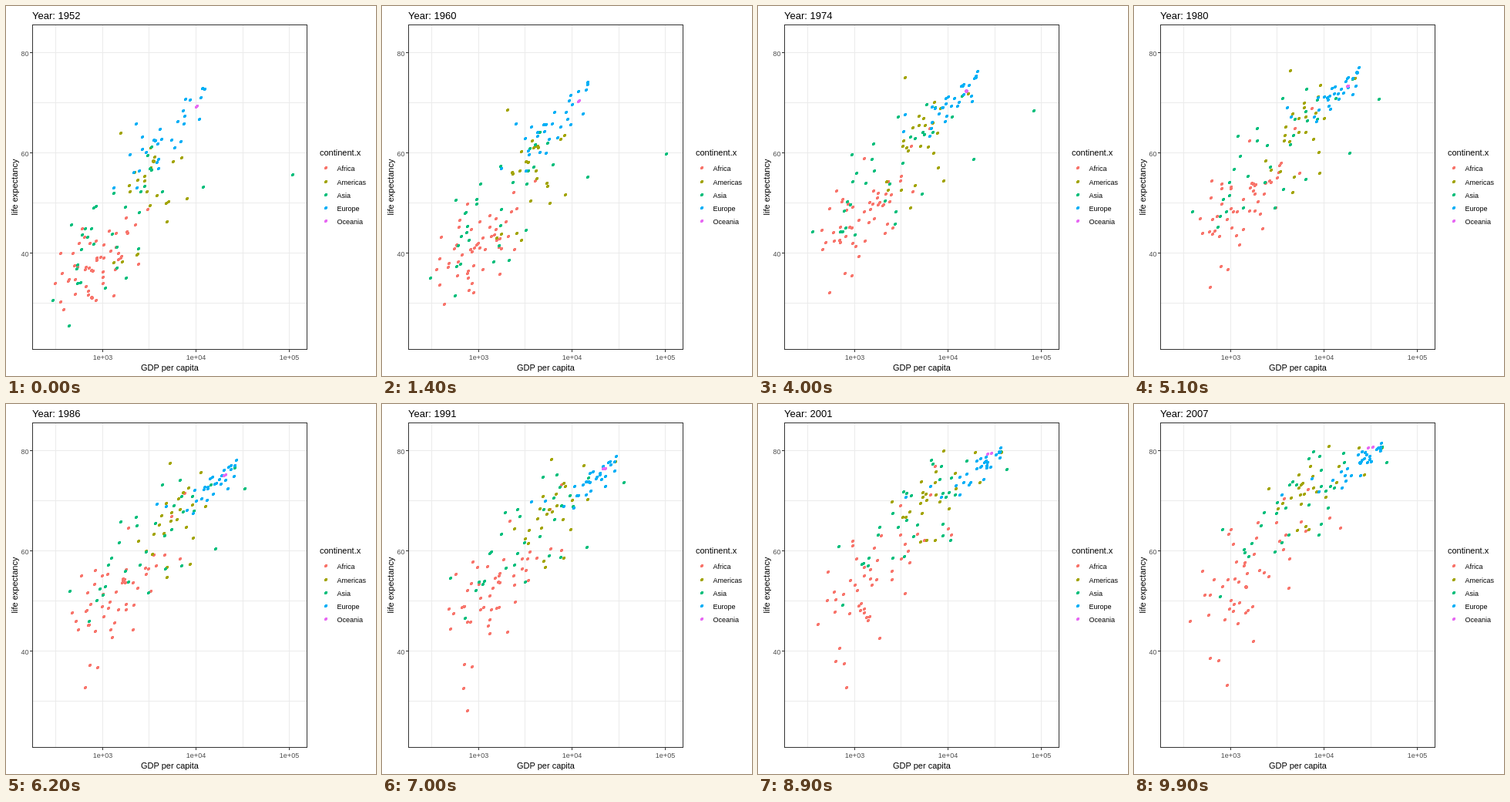
Write an HTML page that moves like this. It is 480x480 px and loops after 10 s.

```html
<!DOCTYPE html>
<html lang="en">
<head>
<meta charset="utf-8">
<title>Life expectancy and GDP per capita</title>
<style>
  html, body { margin: 0; width: 100%; height: 100%; overflow: hidden; background: #fff; }
  svg { display: block; width: 480px; height: 480px; font: 11px "Liberation Sans", Arial, sans-serif; }
  path, rect, circle { shape-rendering: crispEdges; }
  path, rect { fill: none; }
  .small { font-size: 9px; }
  .tick { font-size: 9px; fill: #4d4d4d; }
</style>
</head>
<body>
<svg id="chart" viewBox="0 0 480 480"></svg>
<script>
// Each continent is a cloud of countries whose shape changes from the first year over the middle to the last:
// mean and spread of log10 GDP and of life expectancy, with a correlation (fit) and a skew.
// A path holds [year, log10 GDP, life] for the one country that leaves its cloud.
const continents = [
  { name: 'Africa', color: '#F8766D', count: 51, fit: 0.5, skew: 0.15,
    gdp: [3, 3.21, 3.25], gdpSpread: [0.3, 0.37, 0.43], life: [39.3, 51, 55], lifeSpread: [5.2, 7, 9],
    path: [[1952, 2.69, 40], [1987, 2.93, 44], [1992, 2.87, 23.6], [1997, 2.77, 36.1], [2007, 2.94, 46.2]] },
  { name: 'Americas', color: '#A3A500', count: 25, fit: 0.55, skew: 0.12,
    gdp: [3.53, 3.81, 3.95], gdpSpread: [0.24, 0.25, 0.3], life: [53.3, 65.5, 73.6], lifeSpread: [9, 6.8, 4.2] },
  { name: 'Asia', color: '#00BF7D', count: 32, fit: 0.7, skew: 0.1,
    gdp: [3.17, 3.53, 3.79], gdpSpread: [0.36, 0.48, 0.53], life: [46.3, 61.2, 70.7], lifeSpread: [9, 9, 7.5],
    path: [[1952, 5.035, 55.6], [1957, 5.055, 58], [1967, 4.908, 64.6], [1972, 5.039, 67.7],
      [1977, 4.773, 69.3], [1982, 4.496, 71.3], [2007, 4.675, 77.6]] },
  { name: 'Europe', color: '#00B0F6', count: 30, fit: 0.85, skew: -0.15,
    gdp: [3.69, 4.13, 4.35], gdpSpread: [0.27, 0.2, 0.24], life: [64.4, 72.3, 77.6], lifeSpread: [6, 3.1, 3] },
  { name: 'Oceania', color: '#E76BF3', count: 2, fit: 0.9, skew: 0,
    gdp: [4.01, 4.24, 4.47], gdpSpread: [0.01, 0.03, 0.07], life: [69.3, 73, 80.7], lifeSpread: [0.2, 0.6, 0.5] }
];
const firstYear = 1952, years = 55, steps = 100;

let seed = 7;
function random() {
  seed = (Math.imul(seed, 1664525) + 1013904223) >>> 0;
  return seed / 2 ** 32;
}
const bell = () => 2 * (random() + random() + random() - 1.5);

const mix = (a, b, t) => a + (b - a) * t;
const soften = (v, cap) => v > cap ? cap + 0.2 * (v - cap) : v;

// Value at p (0 to 1) along evenly spaced keys.
function along(keys, p) {
  const i = Math.min(keys.length - 2, Math.floor(p * (keys.length - 1)));
  return mix(keys[i], keys[i + 1], p * (keys.length - 1) - i);
}

// A normal value that wanders slowly while the cloud keeps its spread.
function wanderer() {
  const from = bell(), to = bell();
  return p => from * Math.cos(p) + to * Math.sin(p);
}

function cloudCountry(c) {
  const wealth = wanderer(), health = wanderer();
  return p => {
    const u = wealth(p), v = health(p);
    const gdp = along(c.gdp, p) + along(c.gdpSpread, p) * (u + c.skew * (u * u - 1));
    const life = along(c.life, p) + along(c.lifeSpread, p) * (c.fit * u + Math.sqrt(1 - c.fit ** 2) * v);
    return [soften(gdp, 4.1 + 0.5 * p), soften(life, 71 + 9.5 * p)];
  };
}

function pathCountry(path) {
  return p => {
    const year = firstYear + years * p;
    const k = Math.max(1, path.findIndex(key => key[0] >= year - 1e-6));
    const [y0, gdp0, life0] = path[k - 1], [y1, gdp1, life1] = path[k];
    const t = (year - y0) / (y1 - y0);
    return [mix(gdp0, gdp1, t), mix(life0, life1, t)];
  };
}

const countries = continents.flatMap(c => {
  const places = Array.from({ length: c.count }, () => cloudCountry(c));
  if (c.path) places.push(pathCountry(c.path));
  return places.map(place => ({ place, color: c.color }));
});

const dot = (color, x = 0, y = 0) => `<circle cx="${x}" cy="${y}" r="2" fill="${color}"/>`;
const text = (x, y, s, attrs = '') => `<text x="${x}" y="${y}" ${attrs}>${s}</text>`;
const xTicks = [125.5, 246.5, 367.5], yTicks = [60.5, 190.5, 320.5];
const grid = [64.5, 185.5, 307.5, ...xTicks].map(x => `M${x} 25V445`).join('')
  + [125.5, 255.5, 385.5, ...yTicks].map(y => `M35 ${y}H390`).join('');
const ticks = xTicks.map(x => `M${x} 446v3`).join('') + yTicks.map(y => `M31 ${y}h3`).join('');

const chart = document.getElementById('chart');
chart.innerHTML = `<path d="${grid}" stroke="#ebebeb"/>
  <g id="dots">${countries.map(c => dot(c.color)).join('')}</g>
  <rect x="34.5" y="24.5" width="356" height="421" stroke="#333"/>
  <path d="${ticks}" stroke="#333"/>`
  + text(34, 17, '', 'id="title" font-size="13"')
  + text(212.5, 473, 'GDP per capita', 'text-anchor="middle"')
  + text(-235, 15, 'life expectancy', 'text-anchor="middle" transform="rotate(-90)"')
  + xTicks.map((x, i) => text(x, 459, `1e+0${i + 3}`, 'class="tick" text-anchor="middle"')).join('')
  + yTicks.map((y, i) => text(29.5, y + 4, 80 - 20 * i, 'class="tick" text-anchor="end"')).join('')
  + text(407, 194, 'continent.x')
  + continents.map((c, i) => {
      const y = Math.round(210.3 + 17.28 * i);
      return dot(c.color, 415, y) + text(429.5, y + 4, c.name, 'class="small"');
    }).join('');

const title = document.getElementById('title');
const dots = [...document.getElementById('dots').children];

function draw(now) {
  const p = Math.floor(now / 100) % steps / (steps - 1);
  title.textContent = `Year: ${Math.round(firstYear + years * p)}`;
  countries.forEach(({ place }, i) => {
    const [gdp, life] = place(p);
    dots[i].setAttribute('cx', Math.round(125 + 121.2 * (gdp - 3)));
    dots[i].setAttribute('cy', Math.round(580.5 - 6.5 * life));
  });
}

function loop(now) {
  draw(now);
  requestAnimationFrame(loop);
}
draw(0);
requestAnimationFrame(loop);
</script>
</body>
</html>
```
